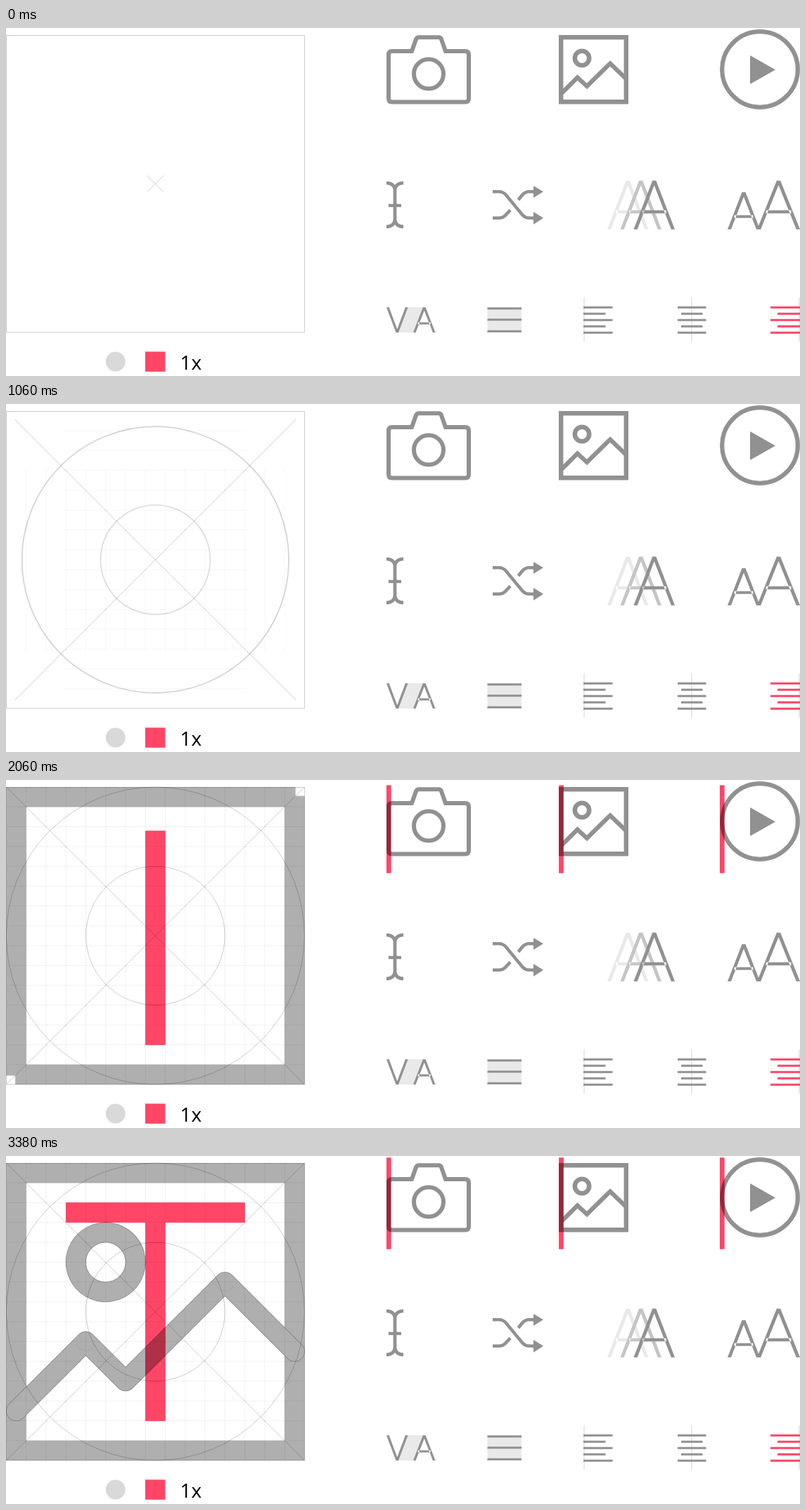
Animation of 1129 by 496 pixels, one loop 3500 ms. Source, as an HTML page:

```html
<!DOCTYPE html>
<html lang="en">
<head>
<meta charset="utf-8">
<title>Icon construction</title>
<style>
html, body { margin: 0; width: 100%; height: 100%; overflow: hidden; background: #fff; }
svg { display: block; }
.mul { mix-blend-mode: multiply; }
</style>
</head>
<body>
<svg id="stage" width="1129" height="496" viewBox="0 0 1129 496" fill="none"></svg>
<script>
const NS = 'http://www.w3.org/2000/svg';
const RED = '#ff4667', GRAY = '#919191', PALE = '#e9e9e9';
const LOOP = 3500, STEP = 20, LAST = 3380;
const CELL = 424 / 15, X0 = 0.4, Y0 = 10, CX = X0 + 212, CY = Y0 + 212;
const SAMPLES = 6, SHUTTER = 10;
const stage = document.getElementById('stage');

function set(el, attrs) {
  for (const k in attrs) el.setAttribute(k, attrs[k]);
  return el;
}
function add(parent, tag, attrs) {
  return parent.appendChild(set(document.createElementNS(NS, tag), attrs));
}
const px = c => X0 + c * CELL;
const py = c => Y0 + c * CELL;
const box = (x, y, w, h) => `M${x} ${y}h${w}v${h}h${-w}z`;

// cubic-bezier(.33, 0, .16, 1)
function ease(x) {
  if (x <= 0) return 0;
  if (x >= 1) return 1;
  let lo = 0, hi = 1;
  for (let i = 0; i < 24; i++) {
    const s = (lo + hi) / 2, r = 1 - s;
    if (3 * r * r * s * 0.33 + 3 * r * s * s * 0.16 + s * s * s < x) lo = s; else hi = s;
  }
  return lo * lo * (3 - 2 * lo);
}
const grow = (t, start, span) => ease((t - start) / span);

/* ---------- fixed icons ---------- */
const icons = add(stage, 'g', {});
const line = (d, w, color = GRAY) => add(icons, 'path', { d, stroke: color, 'stroke-width': w });
const fill = (d, color = GRAY) => add(icons, 'path', { d, fill: color });
const ring = (cx, cy, r, w) => add(icons, 'circle', { cx, cy, r, stroke: GRAY, 'stroke-width': w });

// letter A with flat feet and apex; a negative height turns it into a V
function letter(x, base, w, h, k, bar, thick) {
  const top = base - h, c = x + w / 2, r = x + w;
  let d = `M${x} ${base}H${x + k}L${c + k / 2} ${top}H${c - k / 2}z` +
          `M${r - k} ${base}H${r}L${c + k / 2} ${top}H${c - k / 2}z`;
  if (bar) {
    const inset = bar * (w - k) / 2 + k / 2;
    d += `M${x + inset} ${base - bar * h - thick / 2}H${r - inset}v${thick}H${x + inset}z`;
  }
  return d;
}

// camera
line('M549 33H577L583 16Q584 13.3 587 13.3H615Q618 13.3 619 16L625 33H653Q658 33 658 38V100.5' +
     'Q658 105.5 653 105.5H549Q544 105.5 544 100.5V38Q544 33 549 33Z', 6);
ring(601, 65.5, 21, 6);
// picture
line(box(789.2, 13.2, 92.6, 92), 6.4);
ring(819, 43, 10.2, 6.5);
line('M789 94L812.5 70.5L826 83L859 50.5L883 73.5', 6.2);
// play
ring(1072, 59, 53.8, 6.2);
fill('M1058 39L1094 59.5L1058 80z');
// text cursor
line('M541 220.8C548 220.8 553 225 553 231V273C553 279 548 283.2 541 283.2' +
     'M565 220.8C558 220.8 553 225 553 231M553 273C553 279 558 283.2 565 283.2', 4.8);
line('M544 253H562', 4.4);
// shuffle
line('M692 233.2H701Q707 233.2 711 238L734 266Q738 270.8 744 270.8H752' +
     'M692 270.8H701Q707 270.8 711 266L717 259.5M728.5 245L734 238Q738 233.2 744 233.2H752', 4.6);
fill('M750 225L764 233.3L750 242zM750 262L764 270.8L750 280z');
// opacity and size
[[855, PALE], [873.5, '#c5c5c5'], [892.5, GRAY]].forEach(([x, c]) => fill(letter(x, 287, 58.5, 69.5, 5.2, 0.36, 4.4), c));
fill(letter(1026, 287, 46, 53, 5, 0.345, 4));
fill(letter(1068, 287, 61, 69.5, 5.2, 0.36, 4.4));
// letter spacing
fill('M570 398H594L580 434H556z', PALE);
fill(letter(541, 398, 30.5, -36, 3.6));
fill(letter(579, 434, 31.5, 36, 3.6, 0.36, 3));
// line spacing
fill(box(684.5, 398, 48.5, 36), PALE);
line('M684.5 399.7H733M684.5 415.8H733M684.5 432.2H733', 3);
// alignment
function align(guide, x, w, indent, short, color) {
  line(`M${guide} 384V447`, 1.6, '#e4e4e4');
  let d = '';
  for (let i = 0; i < 5; i++) d += i % 2 ? `M${x + indent} ${398.2 + 9 * i}h${short}` : `M${x} ${398.2 + 9 * i}h${w}`;
  line(d, 3, color);
}
align(822, 821, 41.5, 0, 31.5, GRAY);
align(975, 955, 40.5, 5, 30.5, GRAY);
align(1128, 1087, 42, 10, 32, RED);
// controls
add(icons, 'circle', { cx: 155.8, cy: 475.5, r: 14, fill: '#d9d9d9' });
fill(box(198, 461.3, 28.5, 28.5), RED);
add(icons, 'text', { x: 247.5, y: 487, fill: '#000', 'font-size': 28, 'font-family': "'Open Sans','Noto Sans',sans-serif" }).textContent = '1x';

/* ---------- moving parts ---------- */
const PEAKS = [[0.5, 12.5], [4, 9], [6, 11], [11, 6], [14.56, 9.56]];
const ridge = 'M' + PEAKS.map(([x, y]) => `${px(x)} ${py(y)}`).join('L');

const ridgeAt = t => grow(t, 2389, 1086);
const sunAt = t => Math.min(grow(t, 2389, 803), 0.9999);

function sunPath(p) {
  if (p <= 0) return '';
  const r = 1.5, at = deg => {
    const a = deg * Math.PI / 180;
    return `${px(5 + r * Math.cos(a))} ${py(5 + r * Math.sin(a))}`;
  };
  const R = r * CELL;
  return `M${at(-90 + 144 * p)}A${R} ${R} 0 ${p > 0.5 ? 1 : 0} 0 ${at(-90 - 216 * p)}`;
}
function strokes(parent, color, width) {
  const style = { stroke: color, 'stroke-width': width, 'stroke-linecap': 'round', 'stroke-linejoin': 'round' };
  const hill = add(parent, 'path', { ...style, pathLength: 1 });
  const sun = add(parent, 'path', style);
  return t => {
    const p = ridgeAt(t);
    set(hill, { d: p > 0 ? ridge : '', 'stroke-dasharray': p < 1 ? `${p} 2` : 'none' });
    set(sun, { d: sunPath(sunAt(t)) });
  };
}
function framePath(t) {
  const n = 424 * grow(t, 1598, 600), w = Math.min(n, CELL);
  if (n <= 0) return '';
  const r = X0 + 424, b = Y0 + 424;
  return box(X0, Y0, n, w) + box(X0, Y0, w, n) + box(r - n, b - w, n, w) + box(r - w, b - n, w, n);
}
function redPath(t) {
  const stem = 11 * CELL * grow(t, 1567, 605), bar = 9 * CELL * grow(t, 2110, 640);
  const mark = 130 * grow(t, 1594, 629);
  let d = '';
  if (stem > 0) d += box(px(7), py(13) - stem, CELL, stem);
  if (bar > 0) d += box(CX - bar / 2, py(2), bar, CELL);
  if (mark > 0) for (const x of [541, 786.3, 1015]) d += box(x, 132.5 - mark, 6.4, mark);
  return d;
}

// nested samples over the shutter time give the soft leading edges
const grayGroup = add(stage, 'g', { opacity: 0.31 });
const redGroup = add(stage, 'g', { class: 'mul' });
const layers = [];
for (let i = 0; i < SAMPLES; i++) {
  const opacity = 1 / (SAMPLES - i);
  const g = add(grayGroup, 'g', { opacity });
  const frame = add(g, 'path', { fill: '#000' });
  const draw = strokes(g, '#000', CELL);
  const red = add(redGroup, 'path', { fill: RED, opacity });
  const shift = SHUTTER * (0.5 - (i + 0.5) / SAMPLES);
  layers.push(t => {
    set(frame, { d: framePath(t + shift) });
    draw(t + shift);
    set(red, { d: redPath(t + shift) });
  });
}

const area = { x: 0, y: 0, width: 430, height: 440 };
const mask = add(stage, 'mask', { id: 'edge', maskUnits: 'userSpaceOnUse', ...area });
layers.push(strokes(mask, '#fff', CELL + 1), strokes(mask, '#000', CELL - 1));
add(stage, 'rect', { ...area, fill: '#000', opacity: 0.22, mask: 'url(#edge)' });

const joints = [[1, 0.27], [3, 0.77]].map(([i, from]) => {
  const x = px(PEAKS[i][0]), y = py(PEAKS[i][1]), r = CELL / 2;
  const el = add(stage, 'path', {
    d: `M${x - r * 0.95} ${y + 3}A${r} ${r} 0 0 0 ${x + r * 0.95} ${y + 3}`,
    stroke: '#000', 'stroke-opacity': 0.1, 'stroke-dasharray': '3 2'
  });
  return { el, from };
});

const guides = add(stage, 'g', { stroke: '#000' });
const grid = add(guides, 'path', {});
const outer = add(guides, 'circle', { cx: CX, cy: CY });
const inner = add(guides, 'circle', { cx: CX, cy: CY });
const cross = add(guides, 'path', { 'stroke-opacity': 0.2 });
add(guides, 'rect', { x: 0.5, y: 10.5, width: 424, height: 423.3, 'stroke-opacity': 0.2 });

function circle(el, p, r, extra) {
  set(el, { r: r * p, 'stroke-width': 1 + extra * (1 - p), 'stroke-opacity': 0.2 * p ** 1.5 });
}

function render(t) {
  const h = 212 * grow(t, -210, 1820);
  set(cross, { d: `M${CX - h} ${CY - h}L${CX + h} ${CY + h}M${CX + h} ${CY - h}L${CX - h} ${CY + h}` });
  circle(outer, grow(t, -36, 1815), 212, 7);
  circle(inner, grow(t, 195, 1800), 98.8, 3);

  const p = grow(t, 420, 1765), n = 212 * p;
  let d = '';
  for (let i = 1; i < 15; i++) d += `M${px(i)} ${CY - n}v${2 * n}M${CX - n} ${py(i)}h${2 * n}`;
  set(grid, { d, 'stroke-opacity': 0.06 * p });

  layers.forEach(draw => draw(t));
  joints.forEach(j => set(j.el, { visibility: ridgeAt(t) > j.from ? 'visible' : 'hidden' }));
}

const begin = performance.now();
function tick() {
  const t = (performance.now() - begin) % LOOP;
  render(Math.min(LAST, Math.floor(t / STEP) * STEP));
  requestAnimationFrame(tick);
}
tick();
</script>
</body>
</html>
```
